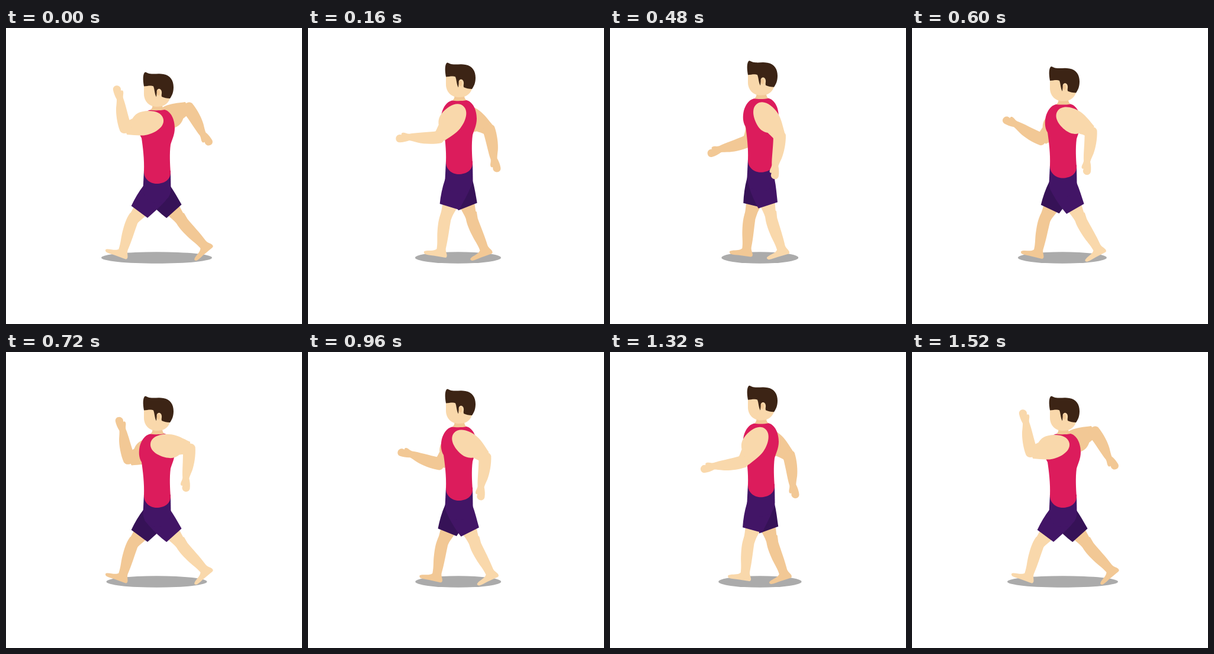
These frames come from a looping animation (500 px wide and 500 px high, 1640 ms). An HTML page:

```html
<!DOCTYPE html>
<html lang="en">
<head>
<meta charset="utf-8">
<title>Walking man</title>
<style>
  html, body { margin: 0; width: 100%; height: 100%; overflow: hidden; background: #fff; }
  svg { display: block; width: 100vw; height: 100vh; }
  .skin { fill: #f9d8ab; }
  .shade { fill: #f2c895; }
  .shorts { fill: #421566; }
  .dark { fill: #361257; }
  .shirt { fill: #dc1c5c; }
  .hair { fill: #3c2415; }
</style>
</head>
<body>
<svg viewBox="0 0 500 500">
  <defs>
    <path id="upper" d="M0-11C13-11 20 6 20 22C20 32 16 42 12 55L-9 57C-9 49-12 42-12 40C-17 35-20 30-20 22C-20 6-13-11 0-11Z"/>
    <path id="fore" d="M11 0C11 14 7 30 3 39C0 45-2 49-3 52C-2 58-2 64-3 69C-4 73-7 74-9 74C-13 74-16 71-16 67L-15 63C-17 64-18 62-18 61C-18 57-15 55-14 50C-14 38-11 22-10 2C-8-9 9-10 11 0Z"/>
    <path id="thigh" d="M-13 42L13 42C12 50 10 56 9 64C7 73-9 73-10 64C-10 58-12 50-13 42Z"/>
    <path id="shin" d="M-10-4C-13 8-12 18-11 29C-10 40-7 48-7 59C-11 64-20 63-26 66C-28 67-28 69-25 71C-20 72-14 71-9 71L9 71C12 71 12 69 12 67C11 63 8 60 8 55C9 40 8 22 8 7L10-4C8-9-8-9-10-4Z"/>
    <path id="pants" d="M-22-5L23-5L23 6C22 20 19 34 17 46L-17 47C-20 34-22 20-22 6Z"/>
  </defs>
  <ellipse id="shadow" cy="388" ry="9.8" fill="#ababab"/>
  <g id="body">
    <g id="farArm" class="shade"><use href="#upper"/><use class="low" href="#fore"/></g>
    <g id="farLeg" class="shade"><use href="#thigh"/><use class="low" href="#shin"/><use class="dark" href="#pants"/></g>
    <g id="nearLeg" class="skin"><use href="#thigh"/><use class="low" href="#shin"/><use class="shorts" href="#pants"/></g>
    <path class="shorts" d="M233 209L278 209L278.500 240C278 271 232 271 231.500 240Z"/>
    <path class="shade" d="M247 96L264 96C264 102 265 104 268 106C266 112 246 112 244 106C247 104 248 101 247 96Z"/>
    <path class="shirt" d="M243 106.500C250 107.500 261 107.500 268 106C279 109 285 123 285 137C285 149 280 157 278 165C276 180 277 199 278 212C278 225 266 231 255 231C244 231 233 224 233 210C234 190 231 168 229 154C224 146 224 136 226 127C229 117 234 109 243 106.500Z"/>
    <path class="skin" d="M233 64L278 64L277 87C273 97 266 101 255 101C242 101 233 92 233 79Z"/>
    <path class="hair" d="M233 66.500C231 55 231 45 235 42.500C238 42.500 239 45.500 246 45.500C253 46 258 44.500 266 46C278 48 283 57 283 68C283 77 280 83 277 87C272 87 267 86 263 84L262 76L255 73L254 84.500C251 80 251 71 249 66.500C245 64.500 239 66 233 66.500Z"/>
    <path class="skin" d="M255 77C254 72 257 70 260 71C264 73 264 80 261 83C259 85 256 85 255 83Z"/>
    <ellipse class="shade" cx="257.500" cy="77.500" rx="2.500" ry="4.500"/>
    <g id="nearArm" class="skin"><use href="#upper"/><use class="low" href="#fore"/></g>
  </g>
</svg>
<script>
  const $ = id => document.getElementById(id);
  const LOOP = 1640, STEP = 40;
  // stride: 1 = near side forward, -1 = far side forward
  const KEYS = [[0, 1], [320, 0], [720, -1], [840, -1], [1160, 0], [1520, 1], [LOOP, 1]];
  // shoulder, then [upper angle, forearm angle] at full swing
  const ARMS = {
    near: { x: 255, y: 124, front: [77, 159], back: [-82, -4] },
    far: { x: 258, y: 127, front: [67, 157], back: [-115, -40] }
  };

  function stride(t) {
    const i = KEYS.findIndex(k => t < k[0]);
    const [t0, a] = KEYS[i - 1], [t1, b] = KEYS[i];
    return a + (b - a) * (t - t0) / (t1 - t0);
  }

  function joint(id, x, y, angle, kx, ky, lowAngle, lift = 0) {
    const g = $(id);
    g.setAttribute('transform', `translate(${x} ${y}) rotate(${angle})`);
    g.querySelector('.low').setAttribute('transform',
      `translate(${kx} ${ky}) rotate(${lowAngle - angle}) translate(0 ${-lift})`);
  }

  function side(name, s) {
    const m = Math.abs(s), arm = ARMS[name];
    const [up, fore] = s > 0 ? arm.front : arm.back;
    joint(name + 'Arm', arm.x, arm.y, up * m, 2, 54, fore * m);
    if (s > 0) joint(name + 'Leg', 254, 242, 38 * m, 1, 64, 20 * m, 5 * m);
    else joint(name + 'Leg', 254, 242, -40 * m, 1, 64, -40 * m);
  }

  function draw(t) {
    const s = stride(t), m = Math.abs(s);
    $('body').setAttribute('transform', `translate(0 ${32 * m})`);
    side('near', s);
    side('far', -s);
    $('shadow').setAttribute('cx', 252.5 + 2 * m);
    $('shadow').setAttribute('rx', 51.5 + (s > 0 ? 42 : 33.5) * m);
  }

  const start = performance.now();
  function tick() {
    const t = (performance.now() - start) % LOOP;
    draw(Math.floor(t / STEP) * STEP);
    requestAnimationFrame(tick);
  }
  tick();
</script>
</body>
</html>
```
